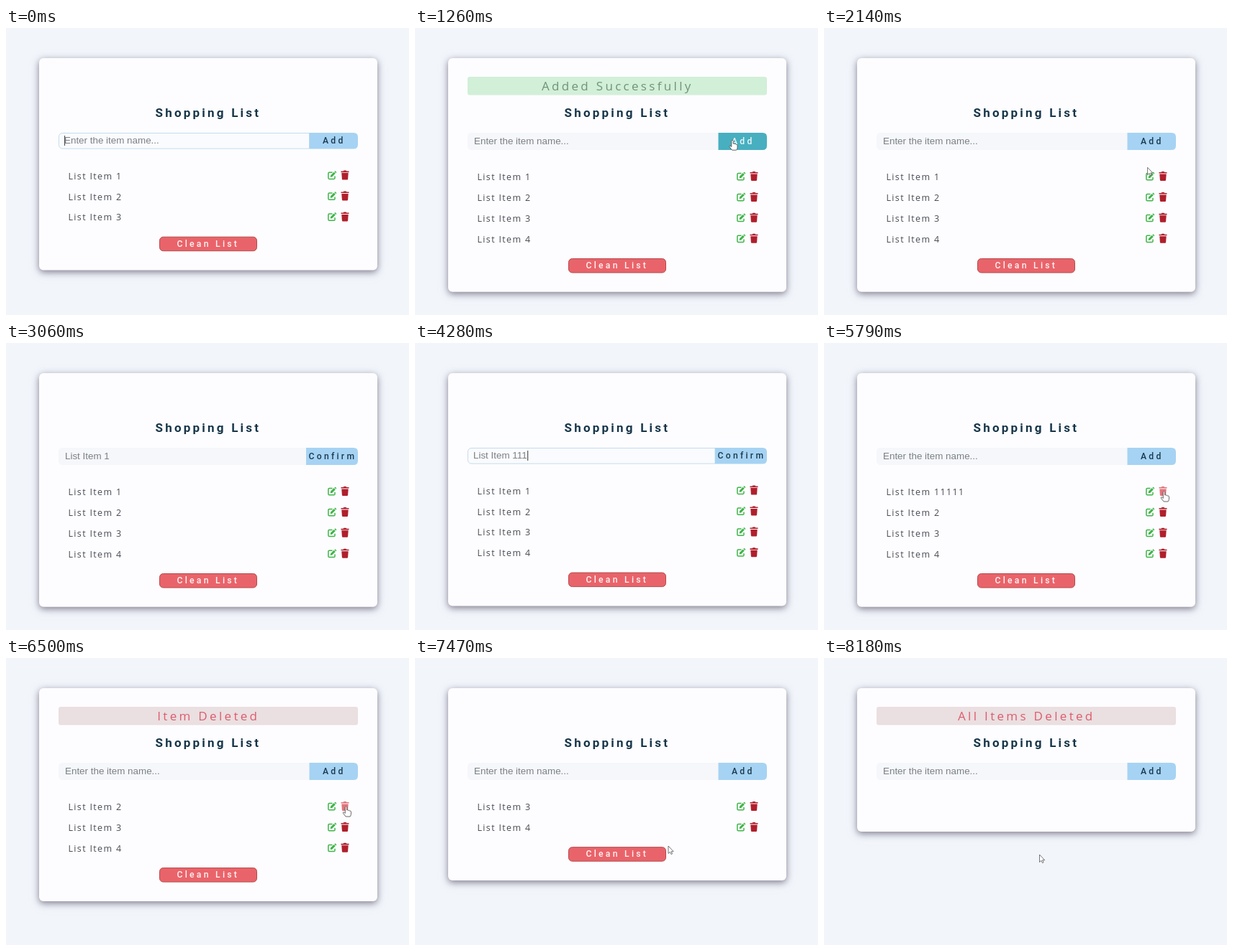
These frames come from a looping animation (560x400 px, 8220 ms). An HTML page:

```html
<!DOCTYPE html>
<html lang="en">
<head>
<meta charset="utf-8">
<title>Shopping List</title>
<style>
  html, body { margin: 0; width: 100%; height: 100%; overflow: hidden; background: #f2f6fb; }
  svg { display: block; width: 560px; height: 400px; }
  .card { fill: #fdfdff; filter: drop-shadow(0 3px 5px rgba(50, 40, 60, .5)) drop-shadow(0 1px 6px rgba(150, 150, 190, .25)); }
  .alert { font: 17px "Open Sans", sans-serif; letter-spacing: 3.32px; text-anchor: middle; }
  .title { font: bold 17px Roboto, sans-serif; letter-spacing: 3.22px; fill: #17364a; }
  .field { font: 13.4px "Liberation Sans", Arial, sans-serif; fill: #7c8084; }
  .btn { font: 500 12.2px Roboto, sans-serif; letter-spacing: 3.25px; }
  .row { font: 12.5px "Open Sans", sans-serif; letter-spacing: 1.35px; fill: #484c54; }
</style>
</head>
<body>
<svg viewBox="0 0 560 400">
  <defs>
    <g id="edit">
      <path d="M6.6 2.1H2.2Q.9 2.1 .9 3.4V10Q.9 11.3 2.2 11.3H8.7Q10 11.3 10 10V7.4" fill="none" stroke="currentColor" stroke-width="1.5"/>
      <path d="M3.7 8.7 4 6.3 8.7 1.6 10.8 3.7 6.1 8.4ZM9.3 1 10 .4Q10.5 0 11 .5L12 1.5Q12.4 2 12 2.5L11.4 3.1Z" fill="currentColor"/>
    </g>
    <path id="trash" d="M0 1H3.2L3.8 0H7.2L7.8 1H11V2.6H0ZM.8 3.5H10.2L9.6 11.8Q9.5 13 8.4 13H2.6Q1.5 13 1.4 11.8Z" fill="currentColor"/>
  </defs>
  <rect width="560" height="400" fill="#f2f6fb"/>
  <rect id="card" class="card" x="46" y="42" width="470" height="296" rx="6"/>
  <g id="alert">
    <rect id="alertBox" x="73" y="68" width="416" height="25.5" rx="3"/>
    <text id="alertText" class="alert" x="281.3" y="87.3"></text>
  </g>
  <text class="title" x="207.5" y="123.5">Shopping List</text>
  <path id="input"/>
  <text id="field" class="field"></text>
  <path id="caret" stroke="#555" stroke-width="1.2"/>
  <path id="add"/>
  <text id="addText" class="btn" y="161.5"></text>
  <g id="rows"></g>
  <g id="clean">
    <rect x="213.5" y=".5" width="135" height="19.5" rx="5" fill="#e9646a" stroke="#b44a4c"/>
    <text class="btn" x="237.5" y="14" fill="#fff3f3">Clean List</text>
  </g>
  <path id="arrow" d="M0 0V10.5L2.4 8.3 4 11.6 5.6 10.8 4.1 7.7H7.2Z" fill="#fff" stroke="#555" stroke-width=".8"/>
  <path id="hand" d="M-1.2 1Q0-.8 1.2 1V5.2Q2.4 4.4 3.2 5.6 4.5 5 5.2 6.3 7 6 7 7.6V10.5Q7 12.5 5.6 14.2H-.4L-4 9.6Q-4.6 8-3.2 8L-1.2 9.6Z" fill="#fff" stroke="#555" stroke-width=".9"/>
</svg>
<script>
const LOOP = 8220, PITCH = 28.9;
const $ = id => document.getElementById(id);
const set = (el, attrs) => { for (const k in attrs) el.setAttribute(k, attrs[k]); };
const show = (el, on) => set(el, { visibility: on ? "visible" : "hidden" });
const put = (el, text) => { if (el.textContent !== text) el.textContent = text; };
const between = (t, a, b) => t >= a && t < b;

// moments of each action, ms
const ADDED = 1180, EDIT = 2600, FOCUS = 3200, UPDATED = 4940,
      DELETE_1 = 6080, DELETE_2 = 6720, CLEANED = 8070;

const mouse = [
  [720, 300, 158], [1060, 441, 156], [1680, 441, 156], [2340, 452, 205],
  [2660, 452, 205], [2960, 300, 158], [4400, 300, 158], [4800, 432, 152],
  [5200, 432, 152], [5800, 472.5, 206.8], [6880, 472.5, 206.8], [7470, 352, 262],
  [7790, 299.5, 274]
];

const alerts = [
  [ADDED, 2000, "Added Successfully", true],
  [UPDATED, 5640, "Item Updated", true],
  [DELETE_1, 7360, "Item Deleted", false],
  [CLEANED, LOOP, "All Items Deleted", false]
];

const rows = Array.from({ length: 4 }, () => {
  const ns = "http://www.w3.org/2000/svg";
  const g = $("rows").appendChild(document.createElementNS(ns, "g"));
  g.innerHTML = `<text class="row" x="86.5" y="212"></text>
    <use href="#edit" x="447" y="200.5"/><use href="#trash" x="465.5" y="200"/>`;
  const [text, edit, trash] = g.children;
  return { g, text, edit, trash };
});

function mouseAt(t) {
  const i = mouse.findIndex(p => p[0] > t);
  if (i === 0) return mouse[0].slice(1);
  if (i < 0) return mouse[mouse.length - 1].slice(1);
  const [t0, x0, y0] = mouse[i - 1], [t1, x1, y1] = mouse[i];
  const u = (t - t0) / (t1 - t0), e = u * u * (3 - 2 * u);
  return [x0 + (x1 - x0) * e, y0 + (y1 - y0) * e];
}

function itemsAt(t) {
  if (t >= CLEANED) return [];
  const first = t < UPDATED ? "1" : "11111";
  const names = [first, "2", "3", "4"].map(n => "List Item " + n);
  if (t < ADDED) names.pop();
  return names.slice(t < DELETE_1 ? 0 : t < DELETE_2 ? 1 : 2);
}

function valueAt(t) {
  if (t < ADDED) return "List Item 4".slice(0, Math.max(0, Math.floor((t - 130) / 48)));
  if (!between(t, EDIT, UPDATED)) return "";
  const extra = Math.floor((t - 4150) / 70) + 1;
  return "List Item 1" + "1".repeat(Math.max(0, Math.min(4, extra)));
}

function draw(t) {
  const items = itemsAt(t), n = items.length, value = valueAt(t);
  const focus = t < 1130 || between(t, FOCUS, 4900);
  const confirm = between(t, EDIT, UPDATED);
  const shift = focus ? -1.4 : 0;
  const [x, y] = mouseAt(t);
  const over = (l, top, r, b) => t >= 720 && x >= l && x <= r && y >= top && y <= b;

  set($("card"), { height: (n ? 252.2 + PITCH * n + shift : 242) - 42 });

  const alert = alerts.find(a => between(t, a[0], a[1]));
  show($("alert"), alert);
  if (alert) {
    put($("alertText"), alert[2]);
    set($("alertText"), { fill: alert[3] ? "#6f9478" : "#dc5c6c" });
    set($("alertBox"), { fill: alert[3] ? "#d2efd8" : "#eadfe1" });
  }

  const left = confirm ? 417 : 421.5, bottom = 170 + shift;
  set($("input"), {
    d: `M${left} 146.5H79Q73.5 146.5 73.5 152V${bottom - 6}Q73.5 ${bottom - .5} 79 ${bottom - .5}H${left}Z`,
    fill: focus ? "#fafbfe" : "#f5f7fa",
    stroke: focus ? "#c4dcec" : "#f5f7fa"
  });
  const field = $("field");
  put(field, value || "Enter the item name...");
  set(field, { x: focus ? 81 : 82, y: focus ? 161.2 : 162 });
  const caretX = value ? 82 + field.getComputedTextLength() : 81.5;
  set($("caret"), { d: `M${caretX} 150V164` });
  show($("caret"), focus && !between(t, 3690, 4150));

  const overAdd = over(left, 146, 489, 170);
  set($("add"), {
    d: `M${left} 146H483Q489 146 489 152V${bottom - 6}Q489 ${bottom} 483 ${bottom}H${left}Z`,
    fill: overAdd ? "#47afc0" : "#a6d3f3"
  });
  put($("addText"), confirm ? "Confirm" : "Add");
  set($("addText"), {
    x: confirm ? 420.5 : 440,
    y: 161.5 + shift / 2,
    fill: overAdd ? "#eaf8fb" : "#1c3a50"
  });

  let overIcon = false;
  rows.forEach((r, i) => {
    show(r.g, i < n);
    if (i >= n) return;
    const dy = shift + PITCH * i;
    const onEdit = over(446, 199 + dy, 460, 213 + dy);
    const onTrash = over(465, 199 + dy, 477, 213 + dy);
    overIcon = overIcon || onEdit || onTrash;
    put(r.text, items[i]);
    set(r.g, { transform: `translate(0 ${dy})` });
    set(r.edit, { color: onEdit ? "#86d48a" : "#3fb548" });
    set(r.trash, { color: onTrash ? "#e2747c" : "#b01f2c" });
  });

  const cleanY = 205.4 + PITCH * n + shift;
  set($("clean"), { transform: `translate(0 ${cleanY})` });
  show($("clean"), n);

  const hand = overAdd || overIcon || (n && over(213, cleanY, 349, cleanY + 21));
  const hidden = t < 720 || over(73, 146, left, 170);
  for (const id of ["arrow", "hand"]) {
    set($(id), { transform: `translate(${x} ${y})` });
    show($(id), !hidden && (id === "hand") === Boolean(hand));
  }
}

const start = performance.now();
function tick() {
  draw((performance.now() - start) % LOOP);
  requestAnimationFrame(tick);
}
tick();
</script>
</body>
</html>
```
